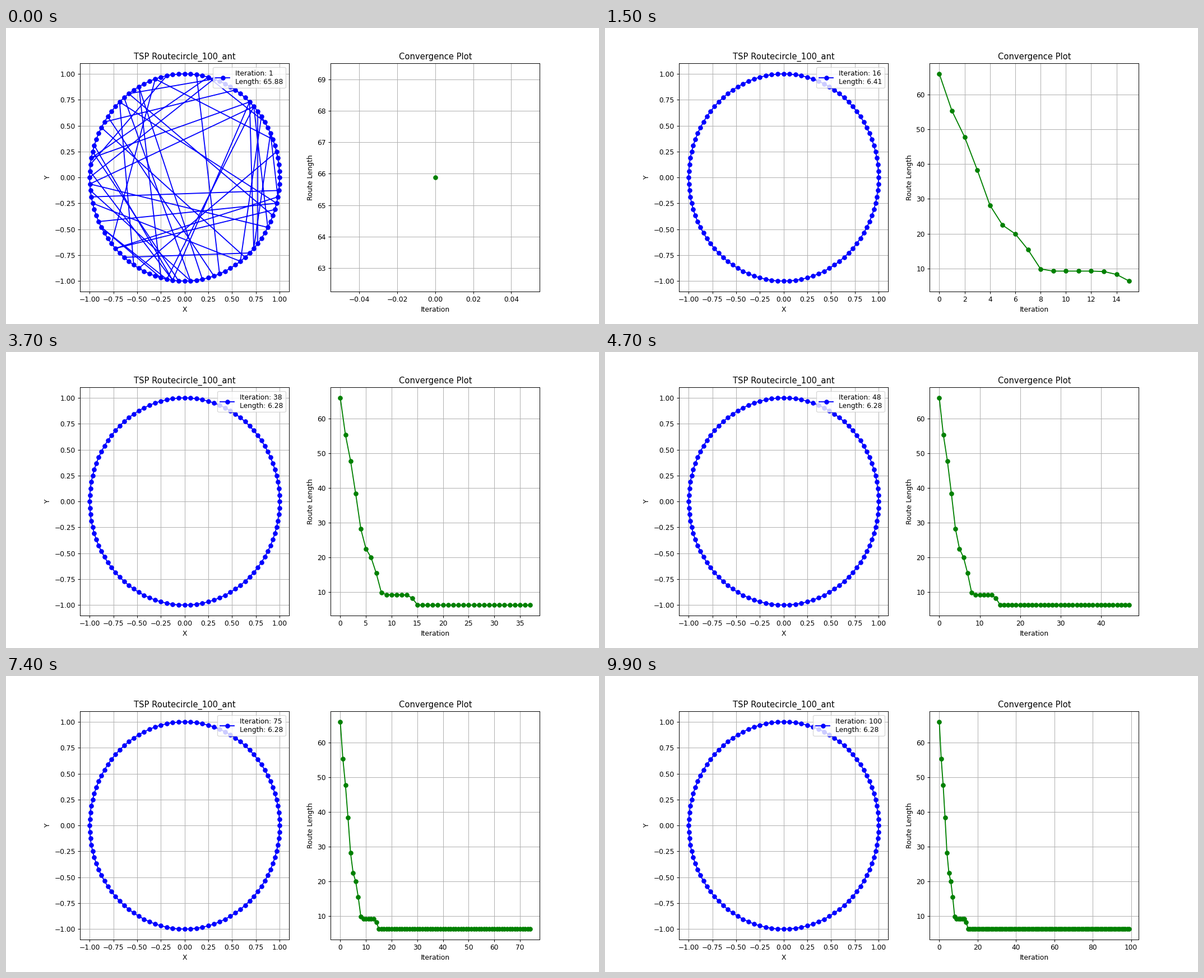
A matplotlib script for the animation above (10000 ms loop, 1058 px wide and 529 px high).

```python
import numpy as np
import matplotlib.pyplot as plt
from matplotlib.animation import FuncAnimation

N = 100
STEPS = 100
BEST = 2 * N * np.sin(np.pi / N)

# Best route length per iteration; the optimum holds to the end.
LENGTHS = [65.88, 55.27, 47.77, 38.29, 28.16, 22.46, 19.96, 15.46, 9.89]
LENGTHS += [9.28] * 4 + [9.15, 8.31, 6.41]
LENGTHS += [BEST] * (STEPS - len(LENGTHS))

# City pairs joined by the most prominent jumps of the first route.
JUMPS = [(53, 98), (51, 92), (12, 51), (62, 95), (64, 87),
         (54, 85), (37, 66), (33, 78), (42, 86), (23, 81)]

angle = 2 * np.pi * np.arange(N) / N
cities = np.column_stack([np.cos(angle), np.sin(angle)])
ring = np.arange(N)


def closed(order):
    return cities[np.append(order, order[0])]


def route_length(path):
    return np.hypot(*np.diff(path, axis=0).T).sum()


def first_route(goal):
    """Ring crossed by the main jumps and random shorter ones."""
    rng = np.random.default_rng(4)
    gap = np.full((1, 2), np.nan)
    parts = [closed(ring)]
    total, pairs = BEST / 2, list(JUMPS)
    while total < goal:
        if pairs:
            a, b = pairs.pop()
        else:
            a = rng.integers(N)
            b = (a + rng.integers(8, 42)) % N
        jump = cities[[a, b]]
        parts += [gap, jump]
        total += route_length(jump)
    return np.concatenate(parts)


def ant_route(goal, tries=800):
    """Shuffle runs of the ring; keep the tour whose length is nearest goal."""
    if goal < 6.5:
        return closed(ring)
    rng = np.random.default_rng(int(goal * 100))
    cuts = max(3, round((goal - BEST) / 1.27))
    best, error = None, np.inf
    for _ in range(tries):
        runs = np.split(ring, np.sort(rng.choice(N, cuts, replace=False)))
        flip = rng.random(len(runs)) < 0.4
        order = np.concatenate([runs[i][::-1] if flip[i] else runs[i]
                                for i in rng.permutation(len(runs))])
        path = closed(order)
        miss = abs(route_length(path) - goal)
        if miss < error:
            best, error = path, miss
    return best


routes = {goal: ant_route(goal) for goal in set(LENGTHS[1:])}
routes[LENGTHS[0]] = first_route(LENGTHS[0])

fig, (left, right) = plt.subplots(1, 2, figsize=(12, 6), dpi=88.16667)

route, = left.plot(*closed(ring).T, "bo-", markevery=slice(0, N),
                   label="Iteration: 1\nLength: 65.88")
left.set(title="TSP Routecircle_100_ant", xlabel="X", ylabel="Y",
         xlim=(-1.1, 1.1), ylim=(-1.1, 1.1))
left.grid(True)
caption = left.legend(loc="upper right").get_texts()[0]

curve, = right.plot([0], LENGTHS[:1], "go-")
right.set(title="Convergence Plot", xlabel="Iteration", ylabel="Route Length")
right.grid(True)


def update(step):
    length = LENGTHS[step]
    route.set_data(*routes[length].T)
    caption.set_text(f"Iteration: {step + 1}\nLength: {length:.2f}")
    curve.set_data(np.arange(step + 1), LENGTHS[:step + 1])
    right.relim()
    right.autoscale_view()
    return route, curve, caption


anim = FuncAnimation(fig, update, frames=STEPS, interval=100,
                     init_func=lambda: update(0), repeat=True, repeat_delay=0)
plt.show()
```
